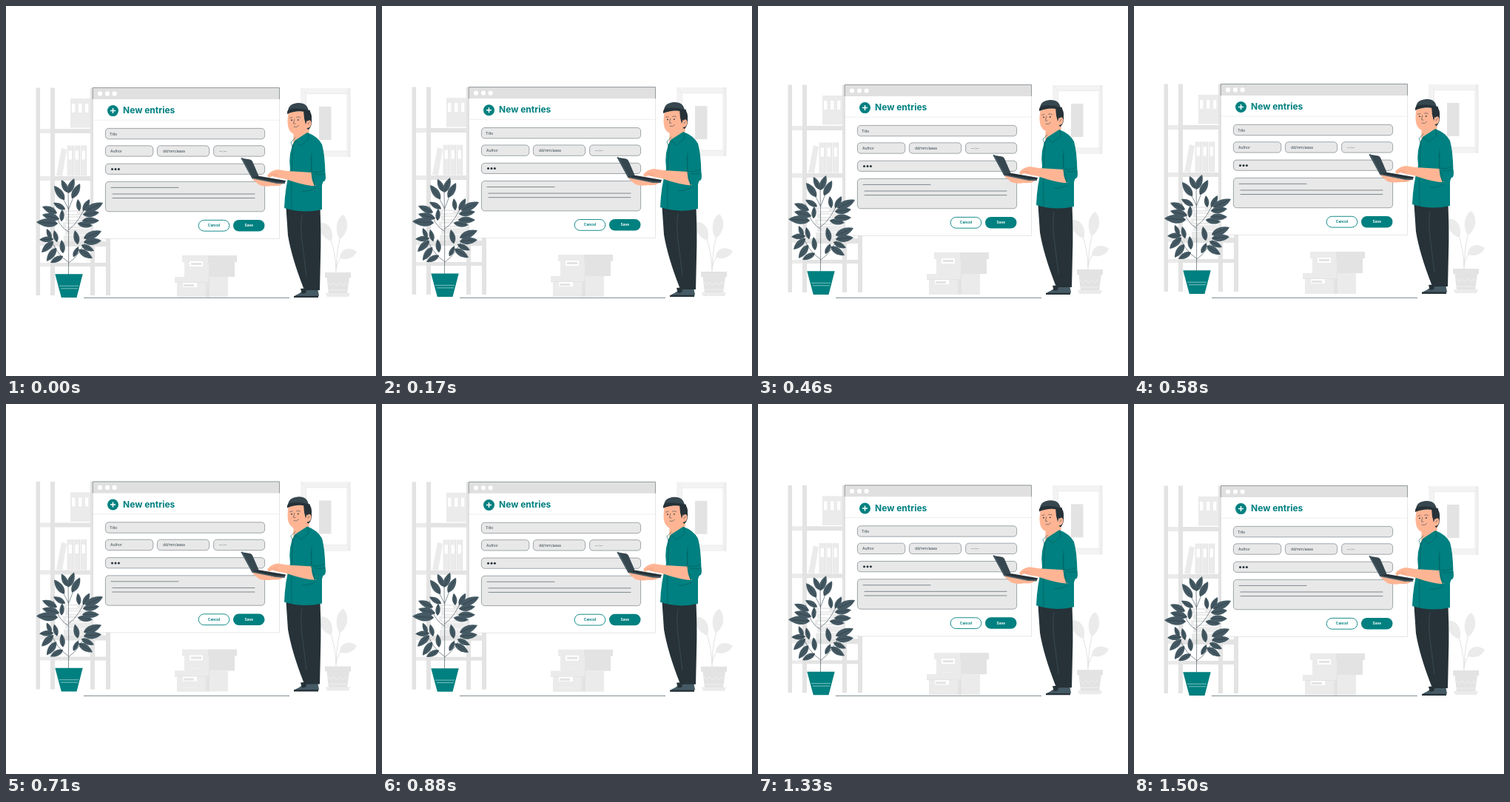
Write an HTML page that moves like this. It is 500 by 500 pixels and loops after 1.54 s.

```html
<!DOCTYPE html>
<html lang="en">
<head>
<meta charset="utf-8">
<title>New entries</title>
<style>
  html, body { margin: 0; width: 100%; height: 100%; overflow: hidden; background: #fff; }
  svg { display: block; width: 100%; height: 100%; }
  text { font-family: Inter, "Open Sans", sans-serif; }
  .label { font-size: 5px; fill: #37474f; }
  .btn { font-size: 4.8px; font-weight: 700; text-anchor: middle; }
  .post { fill: #e3e3e3; }
  .pale { fill: #ebebeb; }
  .faint { fill: #f3f3f3; }
  .white { fill: #fff; }
  .teal { fill: #008080; }
  .dark { fill: #263238; }
  .slate { fill: #455a64; }
  .skin { fill: #ffb594; }
  .field { fill: #e8e8e8; stroke: #59666c; stroke-width: .55; }
  .line { fill: none; stroke: #37474f; stroke-width: .6; stroke-linecap: round; }
  .fold { fill: none; stroke: #00595c; stroke-width: .6; stroke-linecap: round; }
</style>
</head>
<body>
<svg viewBox="0 0 500 500" xmlns="http://www.w3.org/2000/svg">
  <rect class="white" width="500" height="500"/>
  <path d="M105 394.4H383" stroke="#455a64" stroke-width=".7"/>
  <g id="scene">
    <!-- bookshelf -->
    <g id="shelf">
      <path class="pale" d="M46 166H60V172H46ZM46 230H60V236H46ZM46 318H60V324H46ZM46 347H60V352H46Z"/>
      <path class="post" d="M40.500 110.500H46V391H40.500ZM60 110.500H66V391H60ZM114 110.500H120V391H114ZM135 110.500H141V391H135Z"/>
      <path class="post" d="M66 166H115V172H66ZM66 230H115V236H66ZM66 318H141V325H66ZM66 347H141V352H66Z"/>
      <path class="pale" d="M68 229 75 192 82 194 76 230ZM78 276H124V283H78ZM80 284H122V291H80ZM77 292H125V300H77ZM80 301H121V309H80ZM78 310H125V318H78Z"/>
      <path class="white" d="M82 278H96V281H82ZM84 286H100V289H84ZM81 295H97V298H81Z"/>
    </g>

    <!-- picture frame -->
    <path class="pale" d="M398.500 111H465.500V204H398.500Z"/>
    <path class="faint" d="M398.500 111H463V204H398.500Z"/>
    <path class="white" d="M405.500 118.500H461V196H405.500Z"/>
    <path d="M398.500 111 405.500 118.500M463 111 461 118.500M398.500 204 405.500 196M463 204 461 196M405.500 118.500H461V196H405.500Z" fill="none" stroke="#e6e6e6" stroke-width=".7"/>
    <path class="post" d="M423 136H439.500V181H423Z"/>

    <!-- small plant -->
    <path d="M446 360Q446 335 437 309M446 356Q447 325 454 305M446 358Q447 344 456 336" fill="none" stroke="#e3e3e3"/>
    <g class="pale">
      <path d="M440 318C427 314 422 302 425 293C436 292 444 303 440 318Z"/>
      <path d="M451 315C443 303 447 286 456 282C464 291 463 307 451 315Z"/>
      <path d="M451 341C451 329 463 324 474 332C470 341 460 344 451 341Z"/>
    </g>
    <path class="post" d="M431 360H466V367H431ZM433.500 367H464L461 389H436Z"/>
    <path class="pale" d="M432 388H465L463 393H434Z"/>
    <path d="M435 374l4 4 4-4 4 4 4-4 4 4 4-4 3 3M436 384H461" fill="none" stroke="#f3f3f3" stroke-width=".8"/>

    <!-- boxes -->
    <path class="post" d="M273 337H312V346H273ZM274 346H309V366H274Z"/>
    <path class="pale" d="M238 337H273V346H238ZM241 346H274V366H241ZM275 366H300V394H275Z"/>
    <path class="post" d="M228 366H275V374H228ZM231 374H275V394H231Z"/>
    <path class="pale" d="M228 366H274V373H228ZM231 374H270V394H231Z"/>
    <path class="white" d="M248 345H266V363H248ZM239 374H258V389H239Z"/>
    <path class="pale" d="M248 352H266V363H248ZM239 380H258V389H239Z"/>
    <path class="post" d="M250 347H264V350H250ZM240 376H254V379H240Z"/>

    <!-- window -->
    <path class="white" d="M117.500 110.500H369.500V314.500H117.500Z" stroke="#d5d5d5" stroke-width=".6"/>
    <path d="M117.500 110.500H369.500V126H117.500Z" fill="#e0e0e0"/>
    <path d="M117.300 126V110.500H369.500V126" fill="none" stroke="#717b80" stroke-width=".7"/>
    <path d="M118 154.200H369" stroke="#e8e8e8" stroke-width=".7"/>
    <g class="white">
      <circle cx="127" cy="118.500" r="3.100"/><circle cx="137" cy="118.500" r="3.100"/><circle cx="146.600" cy="118.500" r="3.100"/>
    </g>
    <circle class="teal" cx="144.500" cy="141.600" r="7.500"/>
    <path d="M141 141.600H148M144.500 138.100V145.100" stroke="#fff" stroke-width="1.500"/>
    <text class="teal" x="158" y="145.300" font-size="12" font-weight="700">New entries</text>
    <g id="fields"></g>
    <text class="label" x="140" y="174.600">Title</text>
    <text class="label" x="141" y="198">Author</text>
    <text class="label" x="212" y="198">dd/mm/aaaa</text>
    <text class="label" x="288" y="197.800">--:--</text>
    <g class="dark">
      <circle cx="143.500" cy="220.500" r="1.500"/><circle cx="148" cy="220.500" r="1.500"/><circle cx="152.400" cy="220.500" r="1.500"/>
    </g>
    <path class="line" d="M142 245.400H233M144 254H336M144 259.600H336"/>
    <rect class="white" x="260.200" y="289.400" width="41.600" height="14.800" rx="7.400" stroke="#008080" stroke-width=".9"/>
    <rect class="teal" x="307" y="289" width="42.500" height="15.500" rx="7.750"/>
    <text class="btn teal" x="281" y="298.300">Cancel</text>
    <text class="btn white" x="328.300" y="298.300">Save</text>

    <!-- potted plant -->
    <g id="plant">
      <path class="line" stroke-width=".8" d="M84.500 363Q85 300 84 250M85 302Q98 294 111 263M84 305Q70 298 64 272M85 347Q100 337 112 309M84 346Q68 336 58 309M84.500 275Q89 262 97 246M84.500 275Q80 264 70 250"/>
    </g>
    <path class="teal" d="M66.300 362.300H103.700L95.500 394H74.800Z"/>
    <path d="M72 378.300H98M74 381.800H97" stroke="#b4dada" stroke-width=".7"/>

    <!-- man: legs -->
    <path class="slate" d="M404 381 421 381 423 391 421 393.700H390L391 391Q399 388 404 381Z"/>
    <path class="dark" d="M389 391.700H422V394H389ZM398 382 407 381 405 388 400 389Z"/>
    <path class="dark" d="M378.500 273H424.500Q426 310 425 340L424 384H405L402 381Q386 340 381 310Z"/>
    <path d="M400 282Q397 300 401 325L406 365" fill="none" stroke="#455a64" stroke-width=".6"/>
    <!-- torso -->
    <path class="skin" d="M389 165H410L409 176 398 187 388 186Z"/>
    <path class="teal" d="M390 182 407 171Q421 176 427 187Q431 201 431.500 228L427 242 427 275Q402 281 376 273Q377 245 384 221Q381 198 390 182Z"/>
    <path class="fold" d="M388 187Q385 230 386 275M408 172 409 180 398 189 392 183 387 190 385 184 391 178M412 205Q414 216 412 224M418 246Q407 252 400 250"/>
    <!-- head -->
    <path class="dark" d="M401 138Q414 139 413 153Q414 162 409 167L402 164Z"/>
    <path class="skin" d="M382 143Q379 157 382 166Q386 174 394 174Q404 174 407 165Q413 164 412.500 157Q411 152 407 156L405 142Z"/>
    <path class="dark" d="M402 141 411 141 410 153 406.500 155 405 160 403 152Z"/>
    <path d="M381 143Q381 132 394 131Q407 130 409 142Q394 139 381 143Z" fill="#37474f"/>
    <path class="dark" d="M380 146Q379 140 385 139Q397 137 409 141L410 144Q393 140 380 146Z"/>
    <g class="dark">
      <circle cx="386" cy="154.300" r=".9"/><circle cx="394.800" cy="154" r=".9"/>
    </g>
    <path class="line" d="M383.500 151.300 387 150.500M392.500 150.200Q395 149 397.500 150.600M389.700 153 388.500 159 391 159.200M389 163.300Q393 165 395.500 161.500M408 160 410 157"/>

    <!-- arms and laptop -->
    <path class="skin" d="M333 234Q333 231 337 232L370 236 376 239Q371 244 360 243Q347 245 341 241Z"/>
    <path d="M317.500 205.500 330 207.500Q332 208 333 210L343 233 332 232Z" fill="#37474f"/>
    <path class="slate" d="M317.500 205.500 319.500 205 333.500 231.500 332 232Z"/>
    <path class="dark" d="M332 231.500 343 230 378 236 376.500 240 366 239.500Z"/>
    <path class="slate" d="M332 231.500 366 238 377 238 376.500 240 365 239.700 332 233Z"/>
    <path class="skin" d="M353 229Q358 222 367 221L380 223 414 225 419 243Q407 244 378 234L367 232 360 230 355 232Z"/>
    <path d="M358 228 366 227M361 230 368 229" stroke="#e58e70" stroke-width=".5"/>
    <path class="teal" d="M413 188Q426 186 429 199L431 226Q433 231 431 236Q425 240 417 243Q412 234 413 224Z"/>
    <path class="fold" d="M413 199V224Q424 226 430 222M412 225Q416 231 417 243M417 227Q423 229 431 227"/>
  </g>
</svg>
<script>
  const NS = "http://www.w3.org/2000/svg";
  const LOOP = 1540, PEAK = 735, LIFT = 5.6, STEP = 1000 / 24;
  const $ = id => document.getElementById(id);

  function add(parent, tag, attrs) {
    const el = document.createElementNS(NS, tag);
    for (const k in attrs) el.setAttribute(k, attrs[k]);
    parent.appendChild(el);
  }

  // Form fields: x, y, width, height
  [[134.4, 165.4, 215.2, 14.4], [134.4, 188.8, 64.4, 14.4], [204.4, 188.8, 70.2, 14.4],
   [280.6, 188.8, 69, 14.4], [134.4, 213.2, 215.2, 14.2], [134.4, 237.4, 215.2, 40.4]]
    .forEach(([x, y, width, height]) =>
      add($("fields"), "rect", { class: "field", x, y, width, height, rx: 4.4 }));

  function book(x, y, w, h) {
    add($("shelf"), "rect", { class: "pale", x, y, width: w, height: h });
    add($("shelf"), "rect", { class: "white", x: x + w / 4, y: y + 7, width: w / 2, height: 12 });
    add($("shelf"), "rect", { class: "post", x: x + w - .7, y, width: .7, height: h });
  }
  for (let i = 0; i < 3; i++) {
    book(87 + i * 9, 125, 8.5, 39.5);
    book(82.500 + i * 9, 188.5, 8.5, 41);
  }

  function leaf(x1, y1, x2, y2) {
    const dx = x2 - x1, dy = y2 - y1, k = .3;
    const at = (f, s) => `${x1 + dx * f - dy * s} ${y1 + dy * f + dx * s}`;
    add($("plant"), "path", {
      class: "slate",
      d: `M${x1} ${y1}C${at(.25, k)} ${at(.7, k * .8)} ${x2} ${y2}C${at(.7, -k * .7)} ${at(.25, -k)} ${x1} ${y1}Z`
    });
    add($("plant"), "path", { d: `M${x1} ${y1}L${at(.85, 0)}`, stroke: "#263238", "stroke-width": .5 });
  }

  // Leaves: base and tip
  const upper = [
    [84, 253, 92, 233], [83, 252, 75, 235], [79, 262, 65, 243], [89, 260, 100, 240],
    [80, 275, 64, 266], [69, 280, 49, 271], [72, 288, 49, 282], [70, 294, 41, 292],
    [75, 291, 76, 275], [99, 277, 97, 261], [104, 277, 113, 261], [107, 277, 131, 266],
    [104, 282, 126, 279], [103, 290, 126, 290], [97, 294, 117, 297]
  ];
  const lower = [
    [105, 314, 129, 304], [105, 319, 129, 317], [102, 323, 119, 331], [98, 329, 117, 341],
    [97, 322, 93, 303], [64, 315, 45, 316], [64, 318, 48, 333], [68, 327, 55, 345],
    [77, 338, 60, 347], [61, 315, 55, 301], [69, 319, 65, 303], [77, 334, 75, 316],
    [91, 339, 98, 325]
  ];
  upper.concat(lower).forEach(p => leaf(...p));

  function draw(ms) {
    // motion is held at 24 steps a second
    const t = Math.floor((ms % LOOP + 5) / STEP) * STEP;
    const y = -LIFT / 2 * (1 + Math.cos(2 * Math.PI * (t - PEAK) / LOOP));
    $("scene").setAttribute("transform", `translate(0 ${y.toFixed(3)})`);
  }

  const start = performance.now();
  function tick() {
    draw(performance.now() - start);
    requestAnimationFrame(tick);
  }
  draw(0);
  requestAnimationFrame(tick);
</script>
</body>
</html>
```
